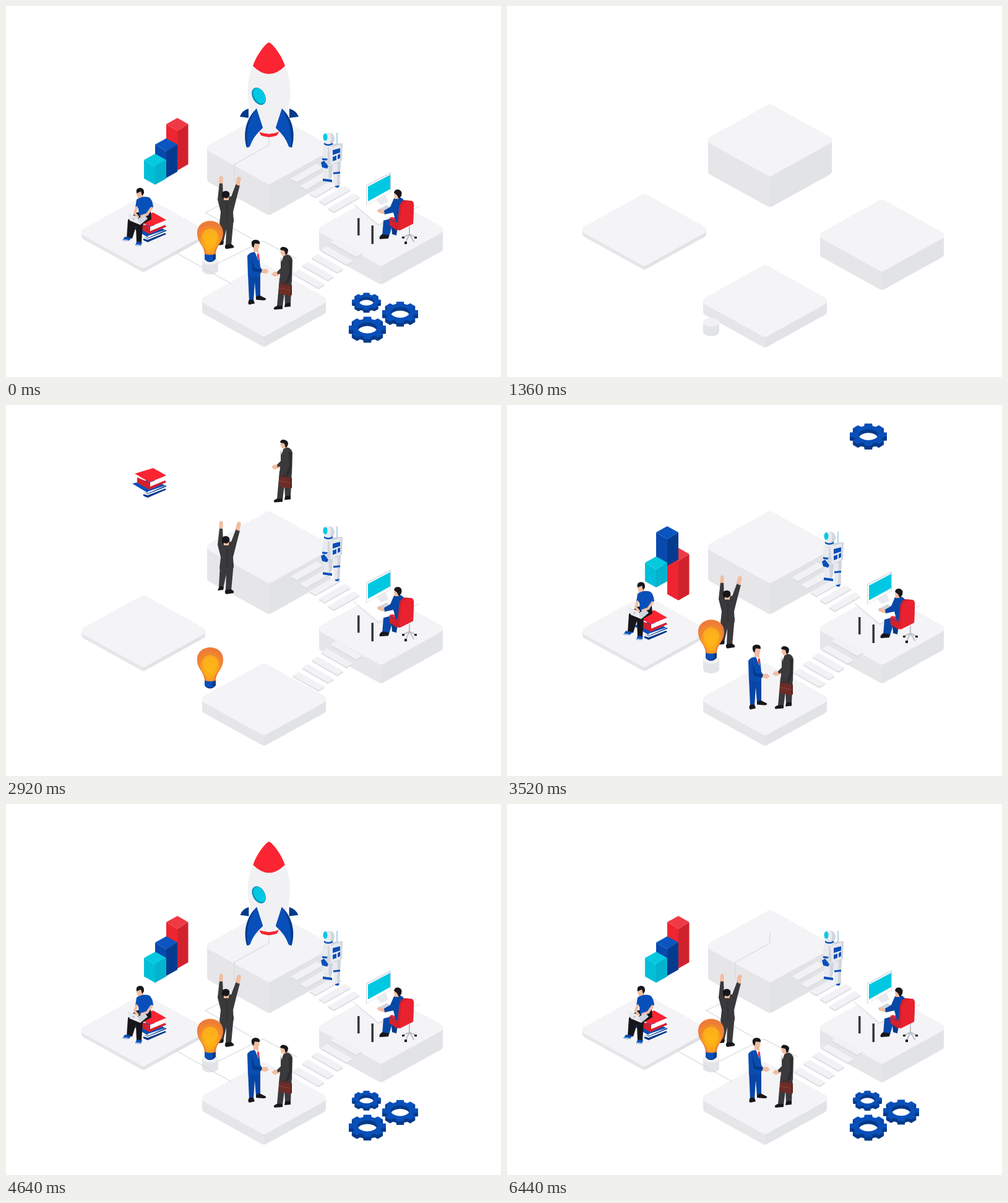
An HTML page that plays this animation: 800x600 px, repeating every 6.6 s.

```html
<!DOCTYPE html>
<html lang="en">
<head>
<meta charset="utf-8">
<title>Startup scene</title>
<style>
html, body { margin: 0; width: 100%; height: 100%; overflow: hidden; background: #fff; }
svg { display: block; width: 800px; height: 600px; }
.blue { fill: #084fb9; } .navy { fill: #053a8a; } .red { fill: #fb2433; } .crim { fill: #d3202d; }
.cyan { fill: #00c8e3; } .skin { fill: #f1bda1; } .coat { fill: #3a393c; } .ink { fill: #17171b; }
.white { fill: #fff; } .pale { fill: #e8eaef; } .grey { fill: #d0d4dc; }
.top { fill: #f4f3f6; stroke: #f4f3f6; } .side { fill: url(#side); stroke: url(#side); }
.top, .side { stroke-width: 12; stroke-linejoin: round; }
.wire path { fill: none; stroke: #d9dade; stroke-width: 1.2; stroke-dasharray: 1; }
.step { fill: #f2f2f5; } .edge { fill: #d9dbe0; }
.limb { fill: none; stroke-linecap: round; stroke-linejoin: round; }
</style>
</head>
<body>
<svg viewBox="0 0 800 600">
<defs>
  <linearGradient id="side"><stop offset=".5" stop-color="#e6e6e9"/><stop offset=".5" stop-color="#e2e3e6"/></linearGradient>
  <radialGradient id="glow" cy=".6"><stop offset=".3" stop-color="#fcb116"/><stop offset=".75" stop-color="#f89d20"/><stop offset="1" stop-color="#f0872c"/></radialGradient>
</defs>

<g id="slabs"></g>

<g data-at="1460" data-v="1000">
  <path fill="#e3e4e7" d="M317 411V427A13 7 0 0 0 343 427V411z"/>
  <ellipse cx="330" cy="411.500" rx="13" ry="7" fill="#f1f1f4"/>
</g>

<g class="wire">
  <path pathLength="1" d="M425 209V225L369 256V284"/>
  <path pathLength="1" d="M372 309L322 334L398 377"/>
  <path pathLength="1" d="M343 416L415 380L470 409"/>
  <path pathLength="1" d="M324 373L275 399L364 449"/>
</g>

<g id="stairsA" data-at="2520" data-v="-1450"></g>
<g id="stairsB" data-at="2600" data-v="-1450"></g>

<g id="rocket">
  <path class="navy" d="M392 166Q381 169 378 179L392 181zM458 166Q469 169 473 179L458 181z"/>
  <path class="crim" d="M409 202Q425 211 442 202L438 209Q425 215 412 209z"/>
  <path fill="#f1f1f4" d="M399 97C386 124 387 165 410 204Q425 210 440 204C463 165 464 124 451 97z"/>
  <path class="red" d="M410 204Q425 210 440 204L438 209Q425 214 412 209z"/>
  <path class="red" d="M425 59C421 59 405 78 399 97Q425 123 451 97C445 78 429 59 425 59z"/>
  <g transform="rotate(-30 408.500 146)">
    <ellipse cx="408.500" cy="146" rx="10" ry="15" fill="#0790b5"/>
    <ellipse cx="409.500" cy="146" rx="8.500" ry="13.500" class="cyan"/>
  </g>
  <path class="navy" d="M405 166C389 180 382 205 389 229L394 227Q399 211 415 197z"/>
  <path class="blue" d="M405 166C392 183 386 205 391 229L394 227Q399 211 415 197z"/>
  <path class="navy" d="M446 166C462 180 469 205 462 229L457 227Q452 211 436 197z"/>
  <path class="blue" d="M446 166C456 180 464 205 460 229L457 227Q452 211 436 197z"/>
</g>

<g data-at="3470" data-v="-1570">
  <path fill="#ef3a45" d="M277 181L294.500 191L277 202L259 191z"/>
  <path fill="#ee2530" d="M259 191L277 202V266L259 256z"/>
  <path fill="#d0222d" d="M294.500 191L277 202V266L294.500 256z"/>
</g>
<g data-at="3350" data-v="-1555">
  <path fill="#0a55c0" d="M259 214L277 224L259 235L241 224z"/>
  <path fill="#0849ae" d="M241 224L259 235V278L241 268z"/>
  <path fill="#053b8f" d="M277 224L259 235V278L277 268z"/>
</g>
<g data-at="3230" data-v="-1455">
  <path fill="#04c9e0" d="M241 239L259 249L241 260L223 249z"/>
  <path fill="#02bed8" d="M223 249L241 260V289L223 279z"/>
  <path fill="#03b2cd" d="M259 249L241 260V289L259 279z"/>
</g>

<g data-at="2780" data-v="-1450">
  <path stroke="#8fc9dc" stroke-width="1.500" d="M535 205V226"/>
  <path class="pale" d="M513 250L527 254L526 282L513 281zM526 254L541 252L539 293L531 293z"/>
  <path class="grey" d="M521 256L528 254L527 276L522 282zM536 253L541 252L539 292L535 293z"/>
  <path class="blue" d="M512 279L527 281V285L512 283zM532 291L539 290L537 294L532 293zM529 269L540 268V271L529 272z"/>
  <path class="pale" d="M513 226Q519 220 528 223L532 256Q520 260 514 253z"/>
  <path class="grey" d="M518 230L522 229L525 256L516 256z"/>
  <path class="pale" d="M514 226Q509 236 512 246L509 256L515 260L520 246V230z"/>
  <path class="blue" d="M511 246L520 247L518 250L511 249zM509 253L514 250L521 259L519 263L511 261z"/>
  <path class="grey" d="M525 228L528 223L544 222L543 249L539 254L526 257z"/>
  <path class="pale" d="M525 228L541 224L540 251L526 257z"/>
  <path class="blue" d="M528 233L540 230V237L528 241zM528 244L534 242V249L528 251zM536 241L540 239V246L536 248z"/>
  <circle class="pale" cx="522" cy="214" r="9.500"/>
  <path class="grey" d="M526 206Q534 213 528 222L523 223Q528 215 524 205z"/>
  <ellipse class="cyan" cx="516" cy="212" rx="3.500" ry="6"/>
  <path class="blue" d="M514 221Q521 226 528 221V224Q521 228 514 224z"/>
</g>

<g data-at="2680" data-v="-1450">
  <path fill="#35353b" d="M568 343h3.500v28h-3.500zM590.500 355h3.500v30h-3.500z"/>
  <path class="white" d="M561 319L606 295L668 323L602 353z"/>
  <path class="edge" d="M561 319L602 353L668 323V325L602 356L561 321z" opacity=".6"/>
  <path class="pale" d="M597 312L613 304L618 317L606 322z"/>
  <path class="grey" d="M582 290L622 269V301L582 323z"/>
  <path class="white" d="M583 291L621 271V301L583 322z"/>
  <path class="cyan" d="M585 292L621 273V296L585 316z"/>
  <path class="grey" d="M599 331L615 322L621 326L606 334z"/>
  <path fill="#0747a6" d="M610 347L632 341L640 355L623 359L619 373L608 372z"/>
  <path class="ink" d="M608 369L619 371L618 376L604 377Q602 373 608 369z"/>
  <path class="navy" d="M623 357L633 357L631 371L624 369z"/>
  <path class="crim" d="M619 344L631 350L640 346V359L632 363L620 355z"/>
  <path class="red" d="M619 343L624 341L634 346L631 349z"/>
  <path fill="#0747a6" d="M627 311Q636 306 643 314L646 343L630 349L626 334L612 337L609 332L621 325z"/>
  <path class="skin" d="M612 337L602 334Q598 330 603 328L611 331zM628 305h7v7h-7z"/>
  <circle class="skin" cx="632" cy="305" r="5"/>
  <path class="ink" d="M627 302Q628 296 635 297Q641 299 639 307L635 312L632 306z"/>
  <path class="limb" stroke="#b9bdc5" stroke-width="1.800" d="M652 357V371M642 374L652 369L662 374M646 382L652 369L659 381"/>
  <path class="ink" d="M640 373h4v3h-4zM660 373h4v3h-4zM644 381h4v4h-4z"/>
  <path class="crim" d="M635 329Q636 315 645 314L655 315Q660 316 659 326L658 352L636 363L632 361z"/>
  <path fill="#e9222f" d="M638 330Q639 319 647 317L655 315Q660 316 659 326L658 352L636 363z"/>
</g>

<g data-at="2980" data-v="-1450">
  <path class="coat" d="M346 345L368 343L364 387L355 388L356 361L351 383L344 381z"/>
  <path class="ink" d="M345 380L352 381L351 386L342 387zM355 386L364 385L368 388V391L356 393Q352 390 355 386z"/>
  <path class="coat" d="M342 313L345 286L350 285L351 308L364 308L372 287L378 290L371 317L367 333L368 350L345 352L347 333z"/>
  <path class="skin" d="M344 287L345 277Q348 271 351 278L350 287zM371 288L373 278Q378 273 380 279L377 291zM352 307h8v7h-8z"/>
  <circle class="skin" cx="356" cy="307" r="5.500"/>
  <path class="ink" d="M349 308Q347 299 356 299Q363 300 361 308L357 311L352 310L350 311z"/>
  <path stroke="#29282b" stroke-width="1" d="M357 318V350"/>
</g>

<g data-at="2880" data-v="-1450">
  <path class="navy" d="M321 399H339V409Q335 414 330 414Q324 414 321 409z"/>
  <path class="blue" d="M321 399H334V412Q324 413 321 408z"/>
  <path fill="#ee7c38" d="M309 367C309 341 351 341 351 367C351 383 340 386 339 401Q330 404 321 401C320 386 309 383 309 367z"/>
  <path fill="url(#glow)" d="M311 372C308 350 352 350 349 372C347 384 337 388 336 401Q330 403 324 401C322 388 312 384 311 372z"/>
  <path fill="#fdb61a" d="M317 373A13 13 0 0 1 343 373Q341 382 334 387H326Q319 382 317 373z" opacity=".7"/>
</g>

<g data-at="3080" data-v="-1450">
  <path class="blue" d="M204 359L236 352L259 363L229 374z"/>
  <path class="white" d="M229 372L258 362V368L229 379z"/>
  <path class="navy" d="M222 373L229 375L259 362V364L229 376zM222 376L229 378L257 367L259 369L229 382L222 379z"/>
  <path class="red" d="M208 343L238 334L259 346L232 357z"/>
  <path class="white" d="M233 357L257 348L256 355L233 365z"/>
  <path class="crim" d="M212 349L233 358V364L257 354L259 357L232 369L212 358z"/>
</g>

<g data-at="3382" data-v="-1450">
  <path class="ink" d="M210 334L234 332L235 345L221 353L219 383H211L210 357L204 376H195L197 346z"/>
  <path class="blue" d="M192 373L203 375L198 380L188 379zM211 381L220 382L218 388L209 387z"/>
  <path fill="none" stroke="#fff" d="M189 378L198 379M210 386L218 387"/>
  <path class="skin" d="M213 301h9v11h-9z"/>
  <path class="blue" d="M211 313Q222 306 232 310Q237 314 238 325L232 329L231 339L215 340L214 327L209 326z"/>
  <path class="limb" stroke="#f1bda1" stroke-width="4" d="M211 326L208 335L213 341M235 327L228 337L219 340"/>
  <ellipse class="skin" cx="216" cy="304" rx="5" ry="6"/>
  <path class="ink" d="M211 303Q209 295 216 294Q224 294 223 303L220 307L218 300z"/>
  <path class="grey" d="M211 345L224 338L229 344L217 354z"/>
  <path class="pale" d="M195 334L212 341L217 354L200 347z"/>
  <circle cx="206" cy="344" r="1.500" fill="#b9bdc5"/>
</g>

<g data-at="3408" data-v="-1450">
  <path fill="#0846a6" d="M391 432L411 431L411 470L404 472L402 447L400 477L393 477z"/>
  <path class="ink" d="M393 475L400 475L402 481L393 483Q390 480 393 475zM404 470L410 468L420 473Q421 476 416 476L404 475z"/>
  <path class="skin" d="M400 391h8v10h-8zM411 426L421 425L425 430L420 433L411 431z"/>
  <path fill="#0a4db0" d="M390 404Q394 398 401 398L409 402L411 422L414 427L411 433V438L391 437z"/>
  <path class="white" d="M402 397L409 400L408 412z"/>
  <path class="red" d="M406 400L409 401L408 411L406 406z"/>
  <path class="navy" d="M396 407L402 424L413 426V431L399 429z"/>
  <ellipse class="skin" cx="404" cy="388" rx="5.500" ry="7"/>
  <path class="ink" d="M398 389Q394 379 403 378Q411 378 410 385L402 384L400 391z"/>
</g>

<g data-at="3150" data-v="-1450">
  <path class="coat" d="M442 440L462 438L460 482L451 483L450 463L447 487L438 486z"/>
  <path class="ink" d="M438 485L447 485V490L434 491Q430 488 438 485zM451 481L460 480V486L450 487z"/>
  <path class="skin" d="M446 394h8v11h-8zM441 430L433 430L429 434L434 438L442 435z"/>
  <path class="coat" d="M444 406L455 402Q462 404 463 411L462 446L442 448L443 433L439 434L438 430L444 424z"/>
  <path class="white" d="M444 405L449 403L445 414z"/>
  <ellipse class="skin" cx="448.500" cy="397" rx="5" ry="6.500"/>
  <path class="ink" d="M443 394Q444 388 451 390Q458 392 455 400L452 403L450 396z"/>
  <path fill="none" stroke="#54231f" stroke-width="1.500" d="M447 452V448L455 447V452"/>
  <path fill="#6e2c26" d="M441 449L460 452V469L441 465z"/>
  <path fill="#54201c" d="M460 452L462 451V467L460 469z"/>
  <path stroke="#8a463d" d="M441 456L460 460"/>
  <path class="limb" stroke="#2c2b2e" stroke-width="4" d="M459 411L460 432L455 445"/>
</g>

<g id="gears"></g>
</svg>

<script>
const $ = id => document.getElementById(id);

// Rounded isometric block: centre x, top y, thickness
const slab = (x, y, h, at, v) => {
  const cy = y + 58;
  return `<g data-at="${at}" data-v="${v}">
    <path class="side" d="M${x - 94} ${cy}L${x} ${cy - 52}L${x + 94} ${cy}v${h}L${x} ${cy + 52 + h}L${x - 94} ${cy + h}z"/>
    <path class="top" d="M${x - 94} ${cy}l94 -52l94 52l-94 52z"/></g>`;
};
$('slabs').innerHTML = slab(425, 172, 50, 1350, 1110) + slab(222, 308, 6, 1032, 1110) +
  slab(606, 304, 30, 1153, 1110) + slab(417, 418, 17, 942, 760);

// Five planks; dir 1 runs down to the right, -1 up to the right
const stairs = (x, y, dx, dy, dir) => {
  let out = '';
  for (let i = 0; i < 5; i++) {
    const px = x + dx * i, py = y + dy * i;
    const plank = (c, o) => `<path class="${c}" d="M${px - 26} ${py - 9 * dir + o}l10 ${-6 * dir}l42 ${24 * dir}l-10 ${6 * dir}z"/>`;
    out += plank('edge', 2) + plank('step', 0);
  }
  return out;
};
$('stairsA').innerHTML = stairs(486, 270, 15, 12, -1);
$('stairsB').innerHTML = stairs(550, 391, -15.300, 12.500, 1);

const gear = (x, y, r, at) => {
  const pts = [];
  for (let i = 0; i < 8; i++)
    for (const [a, k] of [[-.27, .8], [-.2, 1], [.2, 1], [.27, .8]]) {
      const w = i * Math.PI / 4 + a;
      pts.push((x + r * k * 1.020 * Math.cos(w)).toFixed(1) + ' ' + (y + r * k * .61 * Math.sin(w)).toFixed(1));
    }
  const rx = r * .52, ry = r * .3;
  const d = `M${pts.join('L')}zM${x - rx} ${y}a${rx} ${ry} 0 1 0 ${2 * rx} 0a${rx} ${ry} 0 1 0 ${-2 * rx} 0z`;
  let out = `<g data-at="${at}" data-v="-1250" fill-rule="evenodd">`;
  for (let z = 6; z >= 0; z--)
    out += `<path class="${z ? 'navy' : 'blue'}" d="${d}" transform="translate(0 ${z * r / 30})"/>`;
  return out + '</g>';
};
$('gears').innerHTML = gear(582.500, 477.500, 23, 4010) + gear(637, 495.500, 29, 4120) + gear(584, 520.500, 30, 3898);

const LOOP = 6600, STEP = 40, INTRO = 240, LAUNCH = 5040;
const parts = [...document.querySelectorAll('[data-at]')].map(el => ({ el, at: +el.dataset.at, v: +el.dataset.v }));
const wires = document.querySelectorAll('.wire path');
const rocket = $('rocket');

// Steady approach, then a decaying swing past the resting place
const spring = (t, at, v) => {
  const s = (t - at) / 1000;
  return s < 0 ? -v * s : -v * .05 * Math.sin(8 * Math.PI * s) * Math.exp(-8 * s);
};

function draw(now) {
  let t = Math.floor(now % LOOP / STEP) * STEP;
  if (t < INTRO) t = LAUNCH;
  for (const p of parts)
    p.el.setAttribute('transform', `translate(0 ${spring(t, p.at, p.v).toFixed(2)})`);

  const trim = Math.min(1, Math.max(0, (t - 4250) / 350));
  for (const w of wires) {
    w.style.strokeDashoffset = 1 - trim;
    w.style.visibility = trim ? 'visible' : 'hidden';
  }
  const size = Math.max(0, 1 - spring(t, 4210, 7.140));
  const lift = Math.max(0, t - LAUNCH) * .17;
  rocket.style.visibility = size ? 'visible' : 'hidden';
  rocket.setAttribute('transform', `translate(425 ${229 - lift}) scale(${size.toFixed(4)}) translate(-425 -229)`);
}

function tick() {
  draw(performance.now());
  requestAnimationFrame(tick);
}
tick();
</script>
</body>
</html>
```
